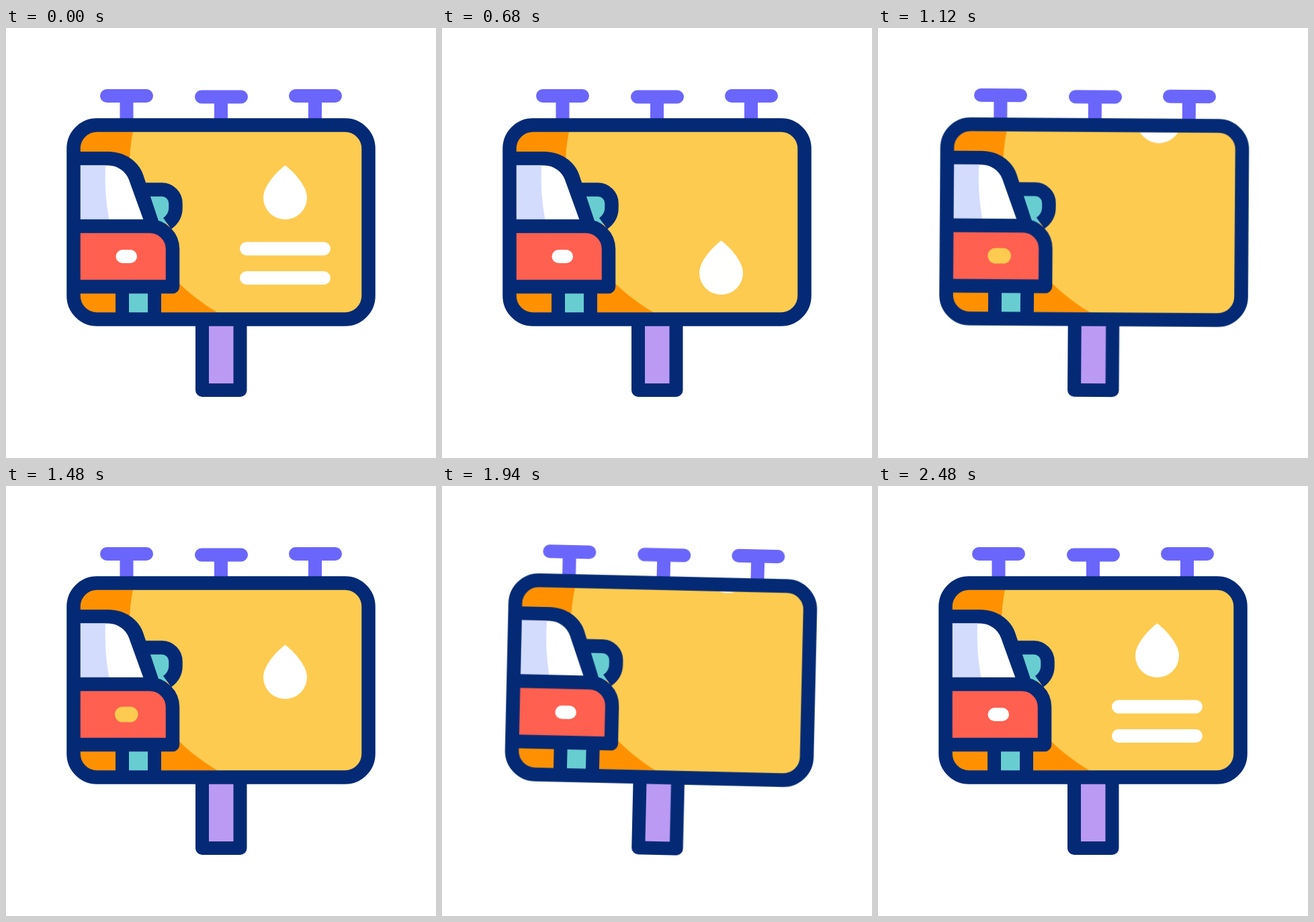
Animation of 640x640 px, one loop 2500 ms. Source, as an HTML page:

```html
<!DOCTYPE html>
<html lang="en">
<head>
<meta charset="utf-8">
<title>Billboard</title>
<style>
  html, body { margin: 0; width: 100%; height: 100%; overflow: hidden; background: #fff; }
  svg { display: block; width: 100%; height: 100%; }

  .navy { fill: #042a75; }
  .teal { fill: #68cdd1; }
  .white { fill: #fff; }
  .outline { fill: none; stroke: #042a75; stroke-width: 20.5; stroke-linejoin: round; }
  .caps { fill: none; stroke: #6b66fb; stroke-width: 20; stroke-linecap: round; }
  .lit { stroke: #fdcb50; stroke-width: 23; }
  .trim { fill: none; stroke-width: 20; stroke-linecap: round; stroke-dasharray: 1 2; }
  .text { stroke: #fff; }
  .splash { stroke: #68cdd1; }

  .board, .fall, .fade, .text, .splash, .lamps, .beam { animation: 2.5s linear infinite; }
  .board { animation-name: tilt; transform-origin: 320px 549px; }
  .fall { animation-name: fall; }
  .fade { animation-name: fade; }
  .text { animation-name: text; }
  .splash { animation-name: splash; }
  .lamps { animation-name: lamps; animation-timing-function: step-end; }
  .beam { animation-name: beam; animation-timing-function: step-end; }

  @keyframes tilt {
    0%, 27.2%, 48%, 64%, 83.6%, 100% { transform: rotate(0deg); animation-timing-function: ease-in-out; }
    34.4%, 37.6%, 70.8%, 73.6% { transform: rotate(2deg); animation-timing-function: ease-in-out; }
  }
  @keyframes fall {
    0% { transform: translateY(0); }
    8% { transform: translateY(0); animation-timing-function: cubic-bezier(.32, 0, .67, 0); }
    27.2%, 38.24% { transform: translateY(112px); }
    38.25% { transform: translateY(-130px); animation-timing-function: cubic-bezier(.11, 0, .5, 0); }
    63.92%, 74.4% { transform: translateY(112px); }
    74.41% { transform: translateY(-130px); animation-timing-function: cubic-bezier(.65, 0, .35, 1); }
    98.4%, 100% { transform: translateY(0); }
  }
  @keyframes fade {
    0%, 27.2%, 38.25%, 63.92%, 74.41%, 100% { opacity: 1; }
    32%, 38.24%, 68.8%, 74.4% { opacity: 0; }
  }
  @keyframes text {
    0%, 2% { stroke-dashoffset: 0; opacity: 1; animation-timing-function: ease-in-out; }
    14.4% { stroke-dashoffset: 1; opacity: 1; }
    14.41%, 81.59% { stroke-dashoffset: 1; opacity: 0; }
    81.6% { stroke-dashoffset: 1; opacity: 1; animation-timing-function: ease-in-out; }
    96.8%, 100% { stroke-dashoffset: 0; opacity: 1; }
  }
  @keyframes splash {
    0%, 27.99% { stroke-dashoffset: 1; opacity: 0; }
    28% { stroke-dashoffset: 1; opacity: 1; animation-timing-function: ease-out; }
    34.8%, 36% { stroke-dashoffset: 0; opacity: 1; }
    41.6% { stroke-dashoffset: -1; opacity: 1; }
    41.61% { stroke-dashoffset: -1; opacity: 0; }
    41.62%, 64.39% { stroke-dashoffset: 1; opacity: 0; }
    64.4% { stroke-dashoffset: 1; opacity: 1; animation-timing-function: ease-out; }
    70.8%, 72% { stroke-dashoffset: 0; opacity: 1; }
    77.6% { stroke-dashoffset: -1; opacity: 1; }
    77.61%, 100% { stroke-dashoffset: -1; opacity: 0; }
  }
  @keyframes lamps {
    0%, 40%, 52.8%, 76%, 89.6%, 100% { opacity: 0; }
    36%, 47.2%, 72%, 83.2% { opacity: 1; }
  }
  @keyframes beam {
    0%, 65.6%, 90.4%, 100% { opacity: 0; }
    42.4%, 78.4% { opacity: 1; }
  }
</style>
</head>
<body>
<svg viewBox="0 0 640 640">
  <defs>
    <clipPath id="panel"><rect x="110" y="154.5" width="420" height="269" rx="25"/></clipPath>
    <path id="caps" d="M150 101h59M291 102.5h59M431 101h59"/>
  </defs>

  <g class="board">
    <!-- lamps -->
    <path fill="#6b66fb" d="M169.5 101h20v40h-20zM310 102h20v40h-20zM450 101h20v40h-20z"/>
    <use href="#caps" class="caps"/>
    <g class="lamps"><use href="#caps" class="caps lit"/></g>

    <!-- post -->
    <rect class="navy" x="282" y="430" width="76.5" height="119" rx="10"/>
    <rect x="302" y="440" width="36.5" height="89" fill="#bb9af3"/>

    <!-- panel -->
    <rect x="100.5" y="144.5" width="439" height="289" rx="35" fill="#fdcb50"/>
    <g clip-path="url(#panel)">
      <path fill="#ff9100" d="M100 154H189C170 250 200 355 316 424H100z"/>
      <g class="fall">
        <path class="white fade" d="M415.5 204.5C426 212 448 234 448 252.5a32.5 32.5 0 0 1-65 0C383 234 405 212 415.5 204.5z"/>
      </g>
    </g>
    <path class="trim text" pathLength="1" d="M473 328.5H358"/>
    <path class="trim text" pathLength="1" d="M473 372H358"/>

    <!-- car -->
    <path class="navy" d="M163 385h68v45h-68z"/>
    <path class="teal" d="M183 395h28v30h-28z"/>
    <path class="teal" d="M205 240.5H232a20.5 20.5 0 0 1 20.5 20.5v7q0 14-12.5 23H215z"/>
    <path class="outline" d="M205 240.5H232a20.5 20.5 0 0 1 20.5 20.5v7q0 14-12.5 23"/>
    <path class="navy" d="M100 184H152C176 184 197 198 204 218L228 290H100z"/>
    <path class="white" d="M110 204.5H152C166 204.5 178 213 183 226L204.500 285.500H110z"/>
    <path fill="#d3dcfd" d="M110 204.500H148Q146 246 153.500 285.500H110z"/>
    <path fill="#ff6050" class="body" d="M100 295H214a34 34 0 0 1 34 34V385H100z"/>
    <path class="outline" d="M100 295H214a34 34 0 0 1 34 34V385H100"/>
    <rect class="white" x="163.500" y="330" width="31.500" height="20" rx="10"/>
    <rect class="beam" x="162" y="328.500" width="34.500" height="23" rx="11.500" fill="#fdcb50"/>

    <rect class="outline" x="100.500" y="144.500" width="439" height="289" rx="35"/>

    <path class="trim splash" pathLength="1" d="M358.500 371.500C350 351 330 336.500 302 336.500"/>
    <path class="trim splash" pathLength="1" d="M472.500 371.500C481 351 501 336.500 529 336.500"/>
  </g>
</svg>
</body>
</html>
```
